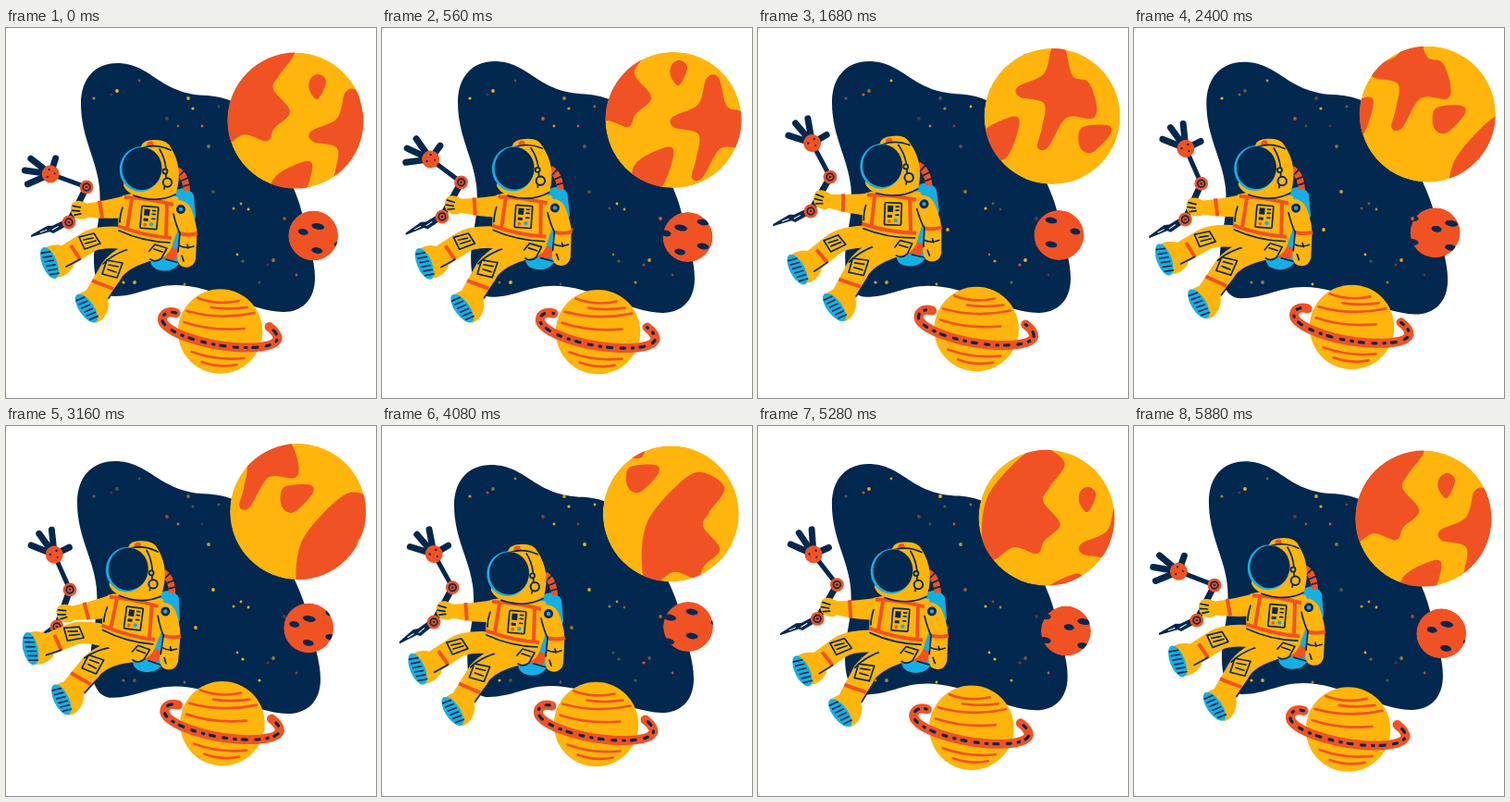
Animation, 400 px wide and 400 px high, one loop 5.92 s. Source, as an HTML page:

```html
<!DOCTYPE html>
<html lang="en">
<head>
<meta charset="utf-8">
<title>Floating astronaut</title>
<style>
  html, body { margin: 0; width: 100%; height: 100%; overflow: hidden; background: #fff; }
  svg { display: block; width: 100vw; height: 100vh; }
  .y { fill: #ffb50c; } .o { fill: #f15223; } .n { fill: #02284f; } .b { fill: #16afe3; }
  .line { fill: none; stroke: #02284f; stroke-width: 1.7; stroke-linecap: round; stroke-linejoin: round; }
  .band { fill: none; stroke: #f15223; stroke-width: 4; }
  .limb { fill: none; stroke: #ffb50c; stroke-linecap: round; stroke-linejoin: round; }
  .rod { fill: none; stroke: #02284f; stroke-linecap: round; }
  .stripe { fill: none; stroke: #f15223; stroke-width: 2.7; stroke-linecap: round; }
</style>
</head>
<body>
<svg viewBox="0 0 400 400">
  <defs>
    <clipPath id="skyClip"><path class="sky"/></clipPath>
    <clipPath id="bigClip"><circle r="73.5"/></clipPath>
    <clipPath id="smallClip"><circle r="27"/></clipPath>
  </defs>
  <path class="sky n"/>
  <g id="stars"></g>

  <g id="big" clip-path="url(#bigClip)">
    <circle class="y" r="73.5"/><g id="patches" class="o"></g>
  </g>

  <g id="small" clip-path="url(#smallClip)">
    <circle class="o" r="27"/><g id="craters" class="n"></g>
  </g>

  <g id="ringed">
    <circle class="y" r="45.7"/>
    <g class="stripe">
      <path d="M-24 -36Q-4 -28 20 -33M-36 -22Q0 -12 37 -20M-10 -26Q8 -23 29 -26"/>
      <path d="M-39 -10Q-10 0 26 -3M-31 22Q-4 32 26 29M-20 33Q0 40 18 36"/>
    </g>
    <path class="band ring" style="stroke-width:10;stroke-linecap:round"/>
    <path id="ringDots" class="rod ring" stroke-width="3.2" stroke-dasharray="4 8 1.5 7 5 9.5"/>
  </g>

  <g id="pack">
    <path class="b" d="M181 177Q196 168 203 181L205 204L190 250Q183 265 167 262Q156 260 156 250L178 205Z"/>
    <path class="band" style="stroke-width:8" d="M181 152Q194 156 196 176"/>
    <path class="line" d="M186 150L183 156M192 155L187 160M197 162L190 165M199 169L192 171M181 148Q198 150 200 176"/>
    <path class="o" d="M173 236L187 239L183 251L168 249Z"/>
    <path class="line" d="M173 250L187 254M178 205L174 238"/>
  </g>

  <g id="clawGlow" clip-path="url(#skyClip)"><g class="claw"></g></g>
  <g id="blade">
    <path class="n" d="M4 -3L20 -5L23 -2L44 0L43 2L23 5L18 3L4 4Z"/>
    <path d="M12 0L20 -1M25 1L33 1" stroke="#fff" stroke-width="1"/>
  </g>
  <g id="lower"><path class="rod" stroke-width="7" d="M0 0H42"/></g>
  <g id="upper"><path class="rod" stroke-width="5" d="M0 0H41"/></g>
  <g class="claw"></g>
  <g id="joint1" class="joint"></g>
  <g id="joint2" class="joint"></g>

  <g id="arm">
    <path class="y" d="M-8 -4Q-6 -10 2 -9L10 -6Q34 -8 56 -13L58 12Q32 13 10 9Q3 13 -4 9Q-10 5 -8 -4Z"/>
    <path class="band" d="M23 -8L25 11"/>
    <path class="line" d="M-6 -4L2 -2M-7 1L1 2M-5 6L2 5"/>
  </g>

  <g id="body">
    <g id="leg1">
      <path class="limb" stroke-width="24" d="M148 230Q103 222 88 232L61 249"/>
      <path class="y" d="M43 237Q55 231 67 238L73 258Q65 270 53 270Z"/>
      <path class="band" d="M70 235L80 250"/>
      <path class="line" d="M79 226L95 222L102 233L85 239ZM84 229L94 227M86 233L97 230M65 258Q73 254 80 250"/>
      <g class="sole" transform="translate(47 254) rotate(-22)"></g>
    </g>
    <g id="leg2">
      <path class="limb" stroke-width="26" d="M158 238Q128 245 115 261L98 290"/>
      <path class="y" d="M80 287Q88 281 98 285L111 297Q110 315 97 319Z"/>
      <path class="band" d="M93 273L116 282"/>
      <path class="line" d="M147 235Q119 241 105 255M109 251L126 254L120 270L104 266ZM111 256L121 258M110 261L119 264M111 292Q117 283 122 276"/>
      <g class="sole" transform="translate(87 303) rotate(-35)"></g>
    </g>
    <path class="y" d="M126 181Q154 174 186 183L191 204L181 231Q176 254 150 250Q127 242 122 225Q119 205 126 181Z"/>
    <path class="band" d="M128 183Q155 184 181 191M136 185L131 216M174 190L173 226"/>
    <path class="band" d="M121 214Q150 225 179 227"/>
    <path class="line" d="M122 219Q148 231 177 232M155 241L161 234L174 238L168 249Q162 254 156 250M160 239L169 242M126 194Q123 203 123 210"/>
    <g transform="rotate(5 155 204)">
      <rect class="y" x="146" y="193" width="18" height="24" rx="1" stroke="#02284f" stroke-width="1.7"/>
      <path class="n" d="M149 196h6v7h-6zM149 206h5v3h-5z"/>
      <path class="line" d="M158 197h3M158 201h3M158 206h3"/>
      <circle class="o" cx="151" cy="213" r="1.8"/><circle class="b" cx="158" cy="212" r="2.2"/>
    </g>
    <path class="y" d="M181 187Q194 184 200 195Q208 215 206 230L205 250Q202 261 191 258Q183 255 186 239L188 224Q181 207 181 187Z"/>
    <path class="band" d="M187 222Q198 225 207 222"/>
    <path class="line" d="M181 201Q184 214 188 222L186 242M187 235Q194 239 203 236M190 246L192 252M196 234L197 238"/>
    <circle class="n" cx="189" cy="196" r="5"/><circle class="b" cx="189" cy="196" r="2.2"/>
    <g id="head">
      <path class="y" d="M146 128Q148 121 159 121Q174 120 178 129Q192 151 184 178Q176 188 151 184Q131 181 127 170L132 134Z"/>
      <path class="o" d="M152 127Q153 121 159 123L160 128Z"/>
      <path class="line" d="M149 129Q164 125 178 132M166 131Q177 149 171 174M138 181Q163 190 183 180"/>
      <ellipse class="b" cx="145.5" cy="152.5" rx="22.7" ry="24.3" transform="rotate(5 145 152)"/>
      <ellipse class="n" cx="147" cy="152" rx="21.5" ry="23" transform="rotate(5 147 152)"/>
      <circle class="y" cx="174.5" cy="167" r="4.7" stroke="#02284f" stroke-width="2"/>
      <circle class="y" cx="172" cy="155" r="2.5" stroke="#02284f" stroke-width="1.8"/>
    </g>
  </g>
</svg>
<script>
const LOOP = 5920, STEP = 40, TAU = Math.PI * 2, DEG = 180 / Math.PI;
const KEY_TIMES = [0, 560, 1680, 3160, 4080, 4720];
const $ = s => document.querySelector(s);
const all = s => document.querySelectorAll(s);
const place = (sel, x, y, turn = 0) =>
  all(sel).forEach(e => e.setAttribute('transform', `translate(${x} ${y}) rotate(${turn})`));

// Periodic smooth interpolation through values at KEY_TIMES.
function along(t, ...values) {
  const n = KEY_TIMES.length;
  const time = i => KEY_TIMES[(i + n) % n] + Math.floor(i / n) * LOOP;
  const value = i => values[(i + n) % n];
  const slope = i => (value(i + 1) - value(i - 1)) / (time(i + 1) - time(i - 1));
  let i = n - 1;
  while (KEY_TIMES[i] > t) i--;
  const d = time(i + 1) - time(i), u = (t - time(i)) / d, v = 1 - u;
  return value(i) * (1 + 2 * u) * v * v + value(i + 1) * (3 - 2 * u) * u * u
    + d * u * v * (slope(i) * v - slope(i + 1) * u);
}

// Closed smooth path through flat x,y coordinates.
function smooth(c) {
  const n = c.length / 2;
  const p = i => { const k = (i + n) % n; return [c[2 * k], c[2 * k + 1]]; };
  let d = 'M' + p(0);
  for (let i = 0; i < n; i++) {
    const [a, b, e, f] = [p(i - 1), p(i), p(i + 1), p(i + 2)];
    const near = b.map((v, k) => v + (e[k] - a[k]) / 6);
    const far = e.map((v, k) => v - (f[k] - b[k]) / 6);
    d += `C${near} ${far} ${e}`;
  }
  return d + 'Z';
}

const skyPath = 'M81 82C81 54 97 38 120 38C158 38 165 72 218 73C262 76 285 110 298 145' +
  'C314 178 318 190 322 208C326 230 334 250 334 270C334 294 320 307 300 307C262 306 225 278 183 278' +
  'C157 278 142 290 117 290C102 290 95 273 95 250C95 222 104 206 101 172C98 142 81 118 81 82Z';
all('.sky').forEach(e => e.setAttribute('d', skyPath));
all('.ring').forEach(e => e.setAttribute('d',
  'M-48 -20C-58 -23 -65 -17 -62 -10C-55 2 -20 14 15 17C45 19 60 15 62 8C62 2 57 -2 53 -5'));

function addStars(cls, ...c) {
  for (let i = 0; i < c.length; i += 2)
    $('#stars').innerHTML += `<circle class="${cls}" cx="${c[i]}" cy="${c[i + 1]}" r="${[1.9, 1.4, 1.6][i / 2 % 3]}"/>`;
}
addStars('y', 120,68, 144,57, 95,76, 197,76, 230,85, 202,87, 219,128, 186,106, 127,275);
addStars('y', 224,177, 254,190, 246,195, 205,218, 262,196, 256,252, 289,251, 250,245, 274,275, 139,275, 193,277);
addStars('o', 174,98, 212,106, 114,72, 301,206, 314,267, 283,256);
const stars = [...$('#stars').children];

// Surface patches, outlined around the planet centre as seen at the given time.
const patchTimes = [];
function addPatch(time, ...outline) {
  const d = smooth(outline);
  patchTimes.push(time);
  $('#patches').innerHTML += `<g><path d="${d}"/><path d="${d}" transform="translate(189.4 153.9)"/></g>`;
}
addPatch(0, 16,-45, 25,-50, 33,-42, 24,-23, 15,-33);
addPatch(4080, -31,61, -26,10, 8,-32, 33,-45, 58,-28, 41,-1, 35,14, 53,38, 36,56, 28,70, 3,63, -20,77);
addPatch(1680, 0,-74, -9,-46, -37,-32, -35,-21, -9,-14, -11,12, -16,33, -5,34, 11,6, 22,0, 44,2, 48,-12, 39,-37, 22,-44, 13,-75);
addPatch(1680, -41,0, -36,11, -50,45, -76,45, -80,25, -68,11);
addPatch(3160, -19,-14, -14,-27, 12,-29, 16,-20, -3,0, -15,-2);
const patchGroups = [...$('#patches').children];

const CRATER_SPAN = 66;
$('#craters').innerHTML = [[-11, -4, 5.5], [5, -10, 7], [4, 16, 6], [29, -16, 6.5], [29, 10, 6.5]].flatMap(([x, y, r]) =>
  [-1, 0, 1, 2].map(k => `<ellipse rx="${r}" ry="3.3" transform="translate(${x + k * CRATER_SPAN} ${y}) rotate(10)"/>`)).join('');

const fingers = [[18, 27], [-12, 28], [-44, 27], [88, 18]].map(([turn, end]) =>
  `<path d="M8 0H${end}M15 0H${end}" transform="rotate(${turn})"/>`).join('');
const [glow, claw] = all('.claw');
glow.innerHTML = `<g class="rod" style="stroke:#16afe3" stroke-width="9.5">${fingers}</g>`;
claw.innerHTML = `<g class="rod" stroke-width="7">${fingers}</g><circle class="o" r="9.5"/>
  <circle class="n" cx="3" cy="4" r="1.2"/><circle class="n" cx="2" cy="-4" r="1.2"/><circle class="n" cx="-4" cy="2" r="1"/>`;
all('.joint').forEach(e => e.innerHTML =
  '<circle class="o" r="7.4"/><circle class="line" r="3.8"/><circle class="n" r="1.3"/>');
const treads = Array.from({ length: 6 }, (_, i) => `M-4 ${5 * i - 13}L5 ${5 * i - 11}`).join('');
all('.sole').forEach(e => e.innerHTML =
  `<ellipse class="b" rx="8" ry="18"/><path class="line" d="${treads}"/>`);

const polar = (x, y, length, deg) => [x + length * Math.cos(deg / DEG), y + length * Math.sin(deg / DEG)];

function drawSky(t) {
  const left = along(t, 81, 82, 80, 77, 78, 79), right = along(t, 334, 338, 338, 340, 337, 336);
  const top = along(t, 38, 36, 36, 38, 42, 43), bottom = along(t, 307, 308, 308, 311, 310, 308);
  const sx = (right - left) / 253, sy = (bottom - top) / 269;
  all('.sky').forEach(e => e.setAttribute('transform',
    `translate(${left - 81 * sx} ${top - 38 * sy}) scale(${sx} ${sy})`));
  stars.forEach((s, i) => s.setAttribute('opacity',
    0.65 + 0.35 * Math.cos(TAU * t / LOOP * (1 + i % 3) + i * 2.4)));
}

function drawPlanets(t) {
  place('#big', along(t, 313, 315, 318, 315.6, 312.3, 311.5), 96.3 + 3.8 * Math.cos(TAU * t / LOOP));
  patchGroups.forEach((g, i) => {
    const age = (t - patchTimes[i] + LOOP) % LOOP / 1000;
    g.setAttribute('transform', `translate(${-32 * age} ${-26 * age})`);
  });
  place('#small', along(t, 332.2, 330.5, 325.4, 327.2, 331, 333), along(t, 224.5, 226, 224, 218.4, 217, 219));
  place('#craters', -CRATER_SPAN * (t / LOOP * 2 % 1), 0);
  place('#ringed', along(t, 231.6, 233.5, 236.2, 234, 231.5, 230.6), along(t, 328, 328.6, 325.5, 321.6, 322.5, 324.5));
  $('#ringDots').setAttribute('stroke-dashoffset', -35 * 3 * t / LOOP);
}

function drawAstronaut(t) {
  const dx = along(t, 0, -2, -9, -17, -9, -3), dy = along(t, 0, -1, -4, 3, 7, 8);
  const lean = along(t, 0, -1, -3, 2.5, 0, -0.5);
  for (const id of ['#body', '#pack'])
    $(id).setAttribute('transform', `translate(${dx} ${dy}) rotate(${lean} 155 204)`);
  $('#leg1').setAttribute('transform', `rotate(${along(t, 0, 0, -3.5, 7, -1, -6)} 140 232)`);
  $('#leg2').setAttribute('transform', `rotate(${along(t, 0, 0, 0.5, 6, 1.5, -3)} 150 240)`);
  $('#head').setAttribute('transform', `rotate(${along(t, 0, -2, -1.5, 0, -1, 0)} 160 180)`);

  const x1 = along(t, 68, 65, 57, 55, 56, 60), y1 = along(t, 210, 204, 198, 217, 212, 207);
  const lower = along(t, -63.4, -61, -60.4, -70.7, -61.6, -57.8);
  const upper = along(t, 200, 217, 242, 246, 241, 259);
  const [x2, y2] = polar(x1, y1, 42.5, lower);
  const [x3, y3] = polar(x2, y2, 41.4, upper);
  place('#blade', x1, y1, along(t, 158.7, 153.4, 158.4, 146, 147.7, 152.3));
  place('#lower', x1, y1, lower);
  place('#upper', x2, y2, upper);
  place('#joint1', x1, y1);
  place('#joint2', x2, y2);
  place('.claw', x3, y3, upper + along(t, 0, 0, 0, 0, 0, 25));

  const handX = (x1 + x2) / 2 + 1, handY = (y1 + y2) / 2 + 5;
  const [sx, sy] = polar(155 + dx, 204 + dy, 29.2, 202 + lean);
  place('#arm', handX, handY, Math.atan2(sy - handY, sx - handX) * DEG);
}

const start = performance.now();
function frame() {
  const t = Math.floor((performance.now() - start) / STEP) * STEP % LOOP;
  drawSky(t);
  drawPlanets(t);
  drawAstronaut(t);
  requestAnimationFrame(frame);
}
frame();
</script>
</body>
</html>
```
